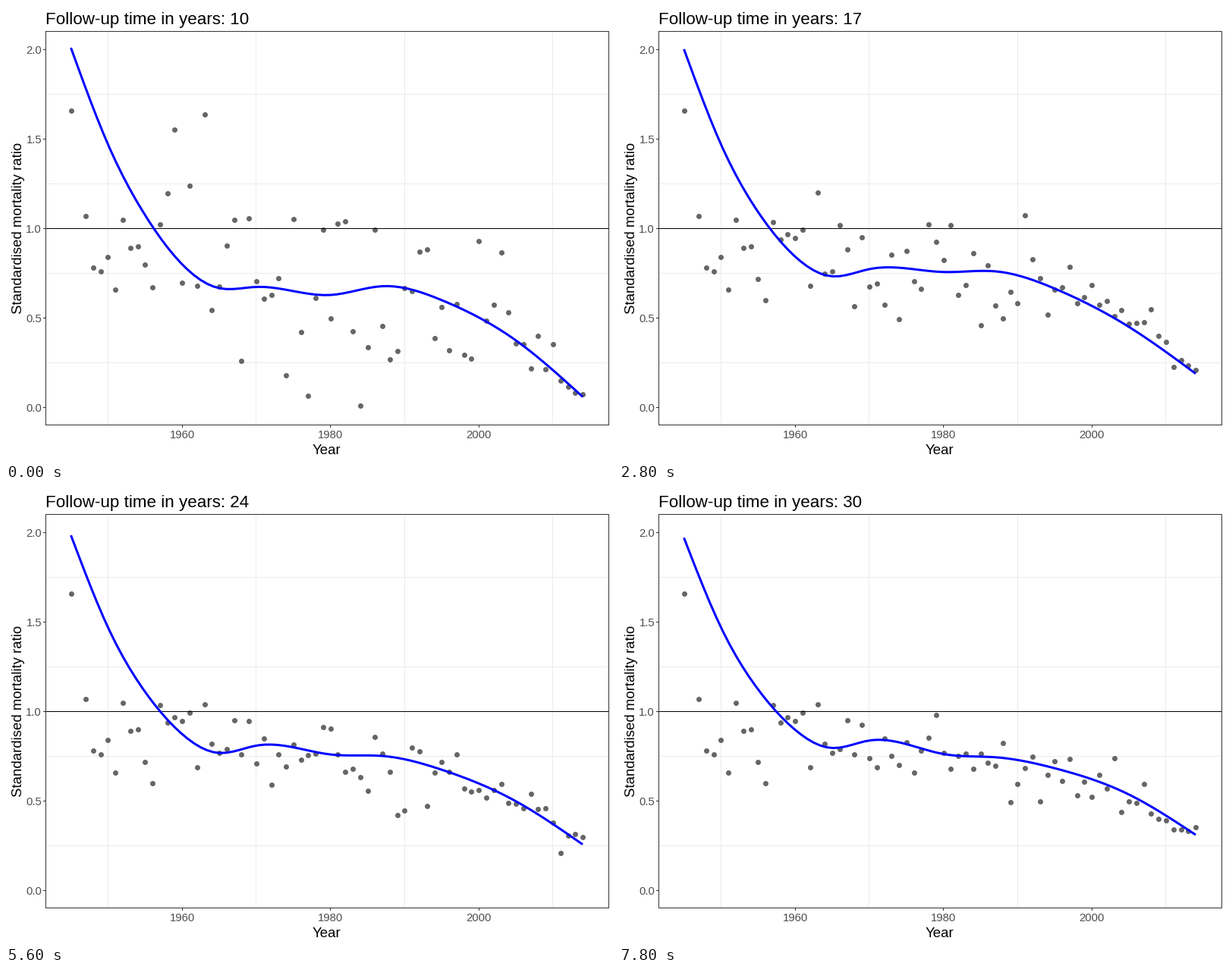
Animation of 800x600 px, one loop 8 s. Source, as a matplotlib script:

```python
import numpy as np
import matplotlib.pyplot as plt
from matplotlib.animation import FuncAnimation

W, H, DPI = 800, 600, 100
PT = 72 / DPI                      # one pixel in points
FRAMES, INTERVAL = 40, 200
FIRST, LAST = 10, 30               # follow-up times in years

plt.rcParams["font.family"] = "Liberation Sans"

YEARS = np.array([1945, *range(1947, 2015)])
FINE = np.linspace(1945, 2014, 80)

# Final ratios of the cohorts up to 1970; they stop moving at year - 1944
SETTLED = np.array([1.66, 1.07, .78, .76, .84, .66, 1.05, .89, .9,
                    .72, .6, 1.035, .94, .97, .945, .995, .69,
                    1.04, .82, .77, .79, .95, .76, .925, .74])

# Key points of the smoothed trend at three follow-up times
KNOTS = np.array([1945, 1950, 1955, 1960, 1965, 1970,
                  1980, 1987, 1995, 2005, 2014])
TREND = {
    10: [2.01, 1.47, 1.075, .8, .667, .674, .629, .678, .6, .375, .06],
    14: [2.01, 1.47, 1.085, .83, .718, .758, .756, .765, .66, .43, .16],
    30: [1.97, 1.47, 1.125, .9, .799, .841, .763, .744, .684, .54, .316],
}


def px(year):
    return 232.2 + (np.asarray(year) - 1960) * 9.775


def py(ratio):
    return 529.5 - 236 * np.asarray(ratio)


def spline(x, y, at):
    """Natural cubic spline through (x, y)."""
    h, n = np.diff(x), len(x)
    a, b = np.eye(n), np.zeros(n)
    for i in range(1, n - 1):
        a[i, i - 1:i + 2] = h[i - 1], 2 * (h[i - 1] + h[i]), h[i]
        b[i] = 6 * ((y[i + 1] - y[i]) / h[i] - (y[i] - y[i - 1]) / h[i - 1])
    m = np.linalg.solve(a, b)
    i = np.clip(np.searchsorted(x, at) - 1, 0, n - 2)
    u, v, w = at - x[i], x[i + 1] - at, h[i]
    return ((m[i] * v**3 + m[i + 1] * u**3) / (6 * w)
            + (y[i] / w - m[i] * w / 6) * v
            + (y[i + 1] / w - m[i + 1] * w / 6) * u)


def trend_at(t, years):
    knots = [np.interp(t, list(TREND), ys) for ys in zip(*TREND.values())]
    return spline(KNOTS, np.array(knots), years)


def ratio_table():
    """Ratios per follow-up year: scatter that drifts and narrows with time."""
    rng = np.random.default_rng(8)
    n = len(SETTLED)
    drift = rng.normal(size=len(YEARS))
    rows = []
    for t in range(FIRST, LAST + 1):
        level = trend_at(t, YEARS)
        level[:n] = SETTLED
        spread = .4 * level * FIRST / t
        spread[:n] *= np.clip((YEARS[:n] - 1944 - t) / 5, 0, 1)
        rows.append(np.maximum(level + spread * drift, 0))
        drift = .9 * drift + .43 * rng.normal(size=len(YEARS))
    return np.array(rows)


RATIOS = ratio_table()

fig = plt.figure(figsize=(W / DPI, H / DPI), dpi=DPI, facecolor="white")
ax = fig.add_axes([0, 0, 1, 1])
ax.set(xlim=(0, W), ylim=(H, 0))
ax.axis("off")

LEFT, RIGHT, TOP, BOTTOM = 52.5, 794.5, 33.5, 552.5
DARK, TEXT, GRID = "#333333", "#4D4D4D", "#EBEBEB"


def rule(xs, ys, color, z):
    """One-pixel line along pixel centres."""
    ax.plot(np.floor(xs) + .5, np.floor(ys) + .5, color=color, lw=PT,
            zorder=z, snap=False, solid_capstyle="projecting",
            solid_joinstyle="miter")


def label(x, y, s, size, color="black", **kw):
    return ax.text(x, y, s, fontsize=size * PT, color=color,
                   va="baseline", **kw)


for year in (1950, 1970, 1990, 2010):
    rule([px(year)] * 2, [TOP, BOTTOM], GRID, 1)
for ratio in (.25, .75, 1.25, 1.75):
    rule([LEFT, RIGHT], [py(ratio)] * 2, GRID, 1)
for year in (1960, 1980, 2000):
    rule([px(year)] * 2, [BOTTOM, BOTTOM + 3], DARK, 5)
    label(px(year), 570, str(year), 14.93, TEXT, ha="center")
for ratio in (0, .5, 1, 1.5, 2):
    rule([LEFT - 3, LEFT], [py(ratio)] * 2, DARK, 5)
    label(47, py(ratio) + 5.5, f"{ratio:.1f}", 14.93, TEXT, ha="right")

rule([LEFT, RIGHT], [py(1)] * 2, "black", 3)
rule([LEFT, RIGHT, RIGHT, LEFT, LEFT],
     [TOP, TOP, BOTTOM, BOTTOM, TOP], DARK, 6)

label(422.5, 591, "Year", 18.67, ha="center")
label(21, 293, "Standardised mortality ratio", 18.67, ha="center",
      rotation=90, rotation_mode="anchor")
title = label(52, 24, "", 22.4, ha="left")

dots, = ax.plot([], [], "o", ms=7 * PT, color="#666666", mew=0,
                snap=False, zorder=2)
trend, = ax.plot([], [], color="#0000FF", lw=3 * PT, zorder=4,
                 solid_capstyle="butt", solid_joinstyle="round")


def draw(i):
    k, half = divmod(i, 2)
    ratios = RATIOS[k] + half / 2 * (RATIOS[k + 1] - RATIOS[k])
    dots.set_data(px(YEARS), py(ratios))
    trend.set_data(px(FINE), py(trend_at(FIRST + i / 2, FINE)))
    title.set_text(f"Follow-up time in years: {FIRST + k + half}")
    return dots, trend, title


anim = FuncAnimation(fig, draw, frames=FRAMES, interval=INTERVAL,
                     init_func=lambda: draw(0), repeat=True, repeat_delay=0)
plt.show()
```
